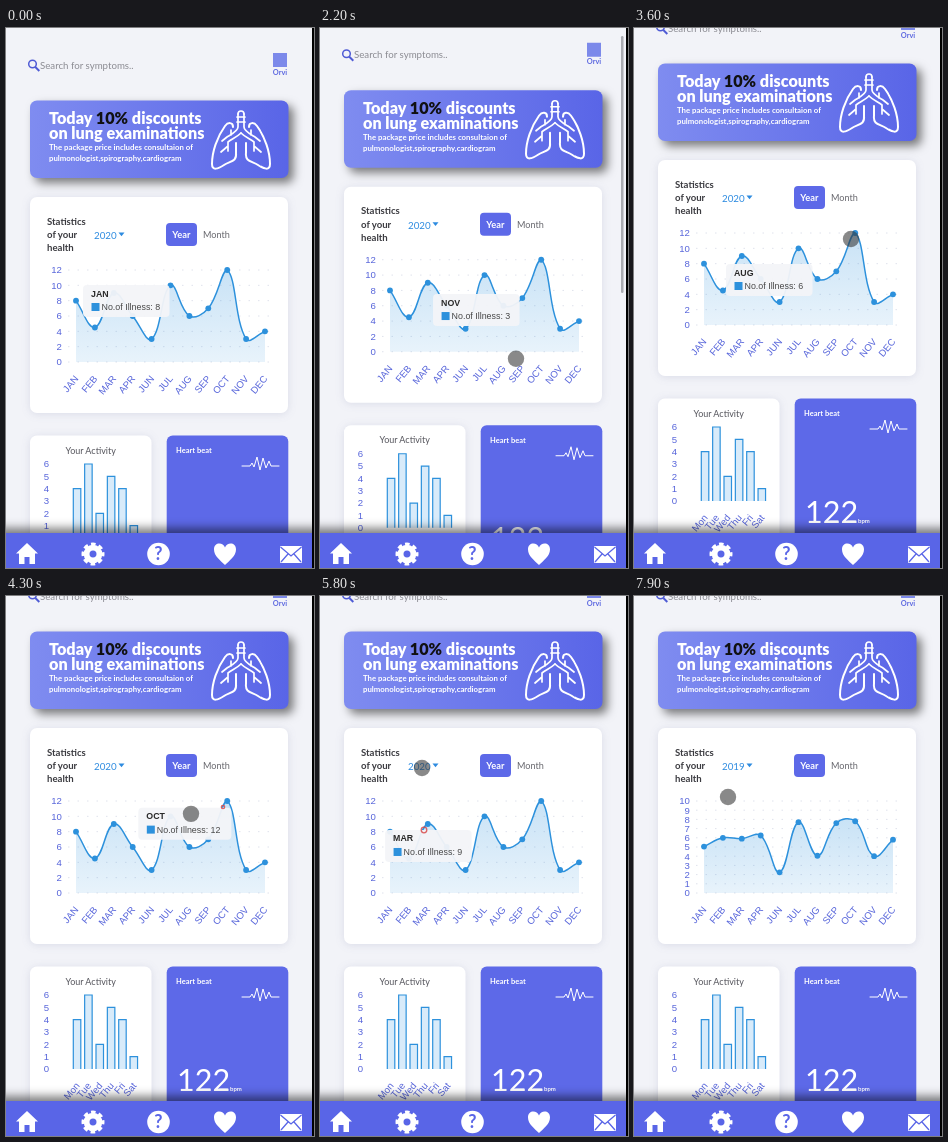
These frames come from a looping animation (308x540 px, 8000 ms). An HTML page:

```html
<!DOCTYPE html>
<html lang="en">
<head>
<meta charset="utf-8">
<title>Health dashboard</title>
<style>
  html, body { margin: 0; width: 100%; height: 100%; overflow: hidden; background: #f2f3f8; }
  svg { display: block; width: 308px; height: 540px; font-family: Lato, sans-serif; }
  .card { fill: #fff; filter: drop-shadow(0 1px 4px rgba(60, 70, 120, .13)); }
  .banner { filter: drop-shadow(5px 5px 5px rgba(0, 0, 0, .5)); }
  .nav { fill: #5965e7; filter: drop-shadow(0 -5px 5px rgba(0, 0, 0, .5)); }
  .menu { fill: #fff; filter: drop-shadow(0 1px 2px rgba(0, 0, 0, .25)); }
  .plain { font-family: "Liberation Sans", Arial, sans-serif; }
  .axis { fill: #5664da; font-size: 9.6px; }
  .end { text-anchor: end; }
  .mid { text-anchor: middle; }
  .bold { font-weight: 700; }
  .line { fill: none; stroke: #2d91dc; stroke-width: 1.5; }
  .white { fill: none; stroke: #fff; stroke-linecap: round; stroke-linejoin: round; }
</style>
</head>
<body>
<svg viewBox="0 0 308 540">
  <defs>
    <linearGradient id="bannerFill"><stop stop-color="#7f8cf0"/><stop offset="1" stop-color="#5965e7"/></linearGradient>
    <linearGradient id="areaFill" x2="0" y2="1">
      <stop stop-color="#2d91dc" stop-opacity=".26"/><stop offset="1" stop-color="#2d91dc" stop-opacity=".11"/>
    </linearGradient>
    <g id="lung" class="white" stroke-width="2">
      <path d="M227 99C227 94 222 94 219 98C211 109 206 124 206 136C206 143 212 141 218 137C224 133 231 134 230 125V115"/>
      <path d="M232 86V99C232 103 226 106 221 109M235 105C231 109 226 111 222 114M225 107V102M221 109L216 113M222 114V123M222 118L215 124" stroke-width="1.7"/>
    </g>
  </defs>
  <rect width="308" height="540" fill="#f2f3f8"/>

  <g id="page">
    <circle cx="26.5" cy="36" r="3.8" fill="none" stroke="#4f5bd5" stroke-width="1.5"/>
    <path d="M29.3 39l4 4" stroke="#4f5bd5" stroke-width="1.9"/>
    <text x="34" y="40.5" font-size="9.7" fill="#8b8b92">Search for symptoms..</text>
    <rect x="267" y="25" width="14" height="14" fill="#7c89ea"/>
    <text class="mid bold" x="274" y="46.5" font-size="7.4" fill="#5d68e0">Orvi</text>

    <rect class="banner" x="24" y="72.5" width="258.5" height="77.5" rx="7" fill="url(#bannerFill)"/>
    <g fill="#fff">
      <g font-size="16.2" font-weight="900">
        <text x="43" y="96">Today <tspan fill="#111">10%</tspan> discounts</text>
        <text x="43" y="111">on lung examinations</text>
      </g>
      <g class="bold" font-size="7.8">
        <text x="43" y="122">The package price includes consultaion of</text>
        <text x="43" y="133">pulmonologist,spirography,cardiogram</text>
      </g>
    </g>
    <use href="#lung"/><use href="#lung" transform="translate(470) scale(-1 1)"/>
    <path class="white" stroke-width="1.7" d="M232 86C232 82 238 82 238 86M231 89H239M231 94H239"/>

    <rect class="card" x="24" y="169" width="258" height="216" rx="7"/>
    <g class="bold" font-size="9.6" fill="#3b3b40">
      <text x="41" y="196.5">Statistics</text><text x="41" y="210">of your</text><text x="41" y="223">health</text>
    </g>
    <text id="year" x="88" y="211" font-size="9.8" fill="#2d8be0"></text>
    <path d="M112.5 204.5h6l-3 3.8z" fill="#2d8be0"/>
    <rect x="160" y="195" width="31" height="23" rx="4" fill="#5d69e8"/>
    <text class="mid bold" x="175.3" y="210" font-size="9.3" fill="#fff">Year</text>
    <text x="197" y="210" font-size="9.1" fill="#66666c">Month</text>
    <g id="chart"></g>

    <rect class="card" x="24" y="407.5" width="121.5" height="160" rx="7"/>
    <text class="mid" x="84.7" y="425.5" font-size="9" fill="#55555c">Your Activity</text>
    <g id="bars"></g>

    <rect x="160.7" y="407.5" width="121.6" height="160" rx="6" fill="#5d69e8"/>
    <g class="bold" fill="#fff">
      <text x="170" y="425" font-size="7.5">Heart beat</text>
      <text x="171" y="531.6" font-size="30.5" font-weight="400">122</text>
      <text x="224" y="531.6" font-size="6">bpm</text>
    </g>
    <path class="white" d="M236 438h8l2-3 2 4 3-10 3 13 3-12 3 10 3-7 2 5h8"/>

    <g id="menu">
      <rect class="menu" x="82" y="219" width="42" height="22" rx="3"/>
      <text x="88" y="235" font-size="9.6" fill="#7d9fe4">2019</text>
    </g>
    <g id="tooltip" class="plain">
      <rect id="tipBox" height="32" rx="4" fill="#f4f5f8" fill-opacity=".95"/>
      <text id="tipTitle" class="bold" x="8" y="11.5" font-size="8.8" fill="#2a2a2a"></text>
      <rect x="8.5" y="18" width="8" height="8" fill="#2d91dc"/>
      <text id="tipBody" x="18.5" y="25.3" font-size="8.9" fill="#484848"></text>
    </g>
  </g>

  <rect id="scrollbar" x="301" y="8" width="2.5" height="257" rx="1.2" fill="#a9aab0"/>
  <rect class="nav" x="-20" y="505" width="348" height="60"/>
  <g fill="#fff">
    <path d="M21 515l11 10.5h-3V536h-5.500v-7h-5v7H13V525.500h-3z"/>
    <g fill="none" stroke="#fff">
      <circle cx="87" cy="526" r="6.4" stroke-width="5.8"/>
      <circle cx="87" cy="526" r="10" stroke-width="3" stroke-dasharray="4.6 3.254" stroke-dashoffset="2.3"/>
    </g>
    <circle cx="152.5" cy="526" r="11.3"/>
    <text class="mid bold" x="152.5" y="532.3" font-size="18" style="fill:#5965e7">?</text>
    <path d="M219 537C214 532 208 528 208 521.500C208 514 217 514 219 519.500C221 514 230 514 230 521.500C230 528 224 532 219 537z"/>
    <rect x="274" y="518" width="22" height="17" rx="1"/>
    <path d="M274.500 519l10.500 9 10.500-9M275 534l7-8M295 534l-7-8" fill="none" stroke="#5965e7" stroke-width="1.3"/>
  </g>
  <circle id="ring" fill="none" stroke="#d84a4a" stroke-width="1.3" stroke-opacity=".85"/>
  <circle id="touch" r="8.2" fill="#333" fill-opacity=".58"/>
  <rect x="306" width="2" height="540"/>
</svg>

<script>
const LOOP = 8000, STEP = 100;
const $ = id => document.getElementById(id);
const clamp01 = v => Math.min(1, Math.max(0, v));
const easeOutQuart = p => 1 - (1 - p) ** 4;
const lerp = (a, b, p) => a + (b - a) * p;
const show = (id, on) => $(id).style.display = on ? '' : 'none';

const months = 'JAN FEB MAR APR JUN JUL AUG SEP OCT NOV DEC'.split(' ');
const years = {
  2020: { max: 12, tick: 2, values: [8, 4.5, 9, 6, 3, 10, 6, 7, 12, 3, 4] },
  2019: { max: 10, tick: 1, values: [5.05, 6, 5.9, 6.25, 2.25, 7.7, 4.05, 7.6, 7.8, 4, 5.8] }
};
const chartTop = 242, chartBottom = 334;
const monthX = i => 70 + i * 18.9;
const valueY = (v, max) => chartBottom - v / max * (chartBottom - chartTop);
const slanted = (label, x, y) =>
  `<text class="axis plain end" transform="translate(${x} ${y}) rotate(-50)">${label}</text>`;

// Cardinal spline with tension 0.4, its handles kept inside the plot.
function smoothPath(points) {
  const handles = points.map((p, i) => {
    const a = points[i - 1] || p, b = points[i + 1] || p;
    const before = Math.hypot(p[0] - a[0], p[1] - a[1]), after = Math.hypot(b[0] - p[0], b[1] - p[1]);
    const at = k => [p[0] + k * (b[0] - a[0]),
      Math.min(chartBottom, Math.max(chartTop, p[1] + k * (b[1] - a[1])))];
    const share = .4 / (before + after);
    return { into: at(-share * before), out: at(share * after) };
  });
  return points.map((p, i) => i
    ? `C${handles[i - 1].out} ${handles[i].into} ${p}` : `M${p}`).join('');
}

function lineChart({ max, tick, values }) {
  let svg = '';
  for (let v = 0; v <= max; v += tick) {
    const y = valueY(v, max);
    svg += `<path d="M62 ${y}H264" stroke="#dfe2ec" stroke-dasharray="1.5 8"/>
      <text class="axis plain end" x="55.8" y="${y + 3.4}">${v}</text>`;
  }
  const points = values.map((v, i) => [monthX(i), valueY(v, max)]);
  const curve = smoothPath(points);
  svg += `<path d="${curve}V${chartBottom}H70z" fill="url(#areaFill)"/><path class="line" d="${curve}"/>`;
  points.forEach(([x, y], i) => {
    svg += `<circle cx="${x}" cy="${y}" r="2.9" fill="#2d91dc"/>` + slanted(months[i], x + 3, 351);
  });
  return svg;
}

function barChart() {
  const unit = 12.33, base = 510;
  let svg = '';
  for (let v = 0; v <= 6; v++)
    svg += `<text class="axis plain end" x="43" y="${base - v * unit + 3.4}">${v}</text>`;
  [4, 6, 2, 5, 4, 1].forEach((v, i) => {
    const x = 67.3 + i * 11.35, h = v * unit;
    svg += `<path d="M${x} ${base}v${-h}h7.5v${h}" fill="#d8ebfa" stroke="#2d91dc" stroke-width="1.2"/>`
      + slanted(['Mon', 'Tue', 'Wed', 'Thu', 'Fri', 'Sat'][i], x + 7, 527);
  });
  return svg;
}

// Tooltip stops: start time, month index, left, top.
const tips = [[-1000, 0, 77, 257], [2135, 9, 148, 295], [2800, 6, 92, 273], [4100, 8, 135, 247], [5470, 2, 65, 271]];
// Taps: time, x, y on the screen.
const taps = [[4100, 217, 211], [5470, 104, 234], [6600, 101, 171]];
// Finger path: time, x, y.
const finger = [[1600, 204, 356], [1800, 196, 341], [1970, 196, 341], [2800, 196, 304], [3300, 196, 304],
  [3600, 217, 211], [4100, 217, 211], [4800, 105, 235], [5470, 105, 235], [5800, 102, 172],
  [6600, 102, 172], [7150, 94, 201], [LOOP, 94, 201]];

function drawTooltip(t) {
  const index = tips.findLastIndex(tip => tip[0] <= t);
  const [start, month, x, y] = tips[index], from = tips[index - 1] || tips[index];
  const p = easeOutQuart(clamp01((t - start) / 400));
  const value = years[2020].values[month];
  $('tooltip').setAttribute('transform', `translate(${lerp(from[2], x, p)} ${lerp(from[3], y, p)})`);
  $('tipBox').setAttribute('width', value > 9 ? 93 : 86.5);
  $('tipTitle').textContent = months[month];
  $('tipBody').textContent = 'No.of Illness: ' + value;
}

function place(id, x, y) {
  $(id).setAttribute('cx', x);
  $(id).setAttribute('cy', y);
}

function drawFinger(t) {
  const visible = t >= 1600 && !(t >= 3300 && t < 3600);
  show('touch', visible);
  if (visible) {
    const i = finger.findLastIndex(k => k[0] <= t), a = finger[i], b = finger[i + 1];
    const p = (t - a[0]) / (b[0] - a[0]);
    place('touch', lerp(a[1], b[1], p), lerp(a[2], b[2], p));
  }
  const tap = taps.find(([start]) => t >= start && t < start + 900);
  show('ring', tap);
  if (tap) {
    place('ring', tap[1], tap[2]);
    $('ring').setAttribute('r', (t - tap[0]) * .0085);
  }
}

let shownYear;
function drawYear(year) {
  if (year === shownYear) return;
  shownYear = year;
  $('year').textContent = year;
  $('chart').innerHTML = lineChart(years[year]);
}

function frame() {
  const t = Math.floor(performance.now() % LOOP / STEP) * STEP;
  const scroll = 37 * clamp01((t - 1970) / 830);
  $('page').setAttribute('transform', `translate(0 ${-scroll})`);
  show('scrollbar', t >= 2000 && t < 3000);
  show('tooltip', t < 6600);
  show('menu', t >= 6600 && t < 7500);
  drawYear(t < 7900 ? 2020 : 2019);
  drawTooltip(t);
  drawFinger(t);
  requestAnimationFrame(frame);
}

$('bars').innerHTML = barChart();
frame();
</script>
</body>
</html>
```
